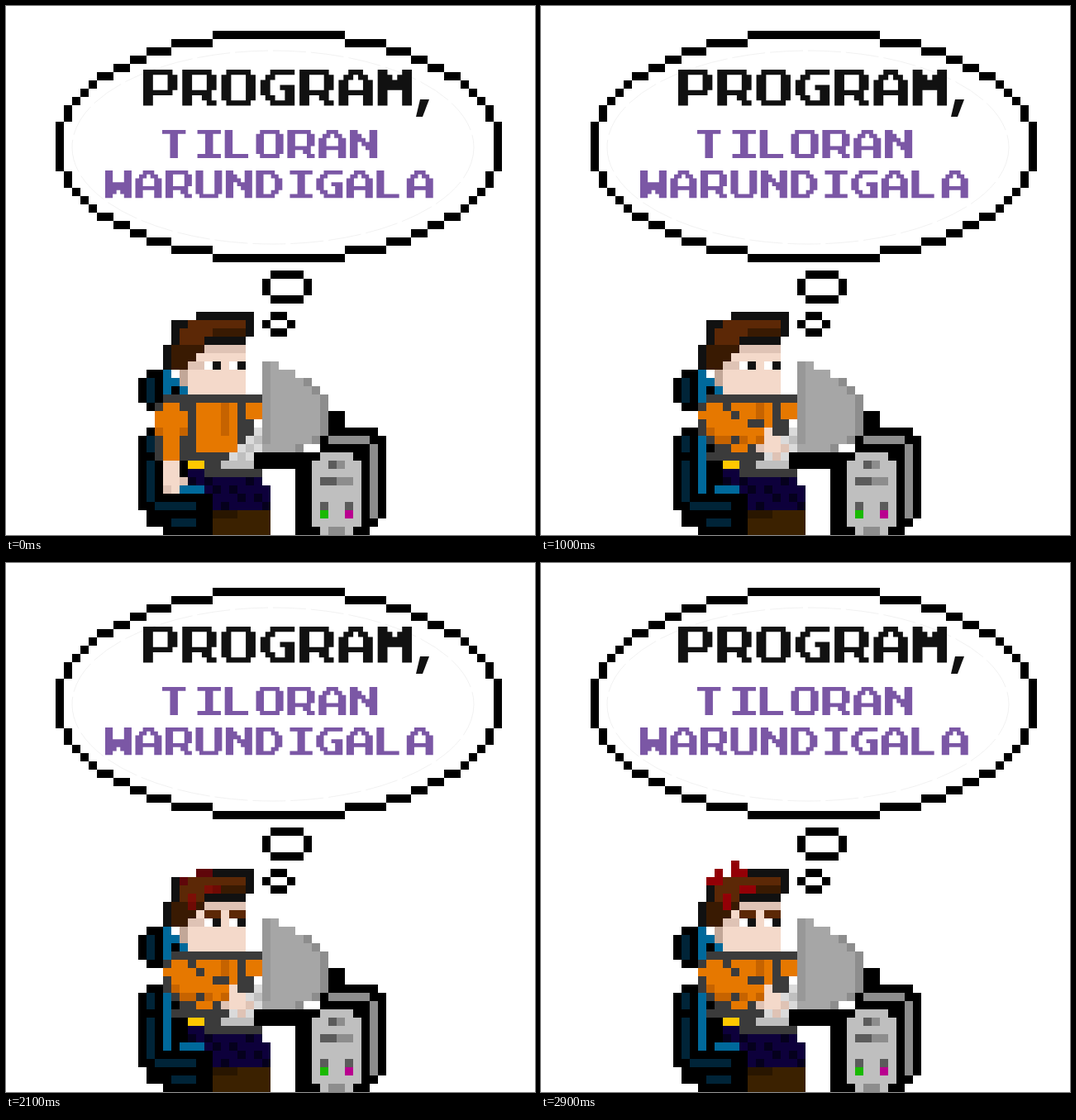
An HTML page that plays this animation: 640x640 px, repeating every 3 s.

```html
<!DOCTYPE html>
<html lang="en">
<head>
<meta charset="utf-8">
<title>Thinking programmer</title>
<style>
  html, body { margin: 0; width: 100%; height: 100%; overflow: hidden; background: #fff; }
  svg { display: block; width: 100vw; height: 100vh; }
</style>
</head>
<body>
<svg id="stage" viewBox="0 0 640 640"></svg>
<script>
const NS = 'http://www.w3.org/2000/svg';
const stage = document.getElementById('stage');
const BLACK = '#000', INK = '#111', NAVY = '#002438', BLUE = '#00699b';
const BROWN = '#5c2806', DARK = '#391a02', SKIN = '#f4d9ca', TAN = '#dfc3b5';
const ORANGE = '#e67800', RUST = '#c66300', CLOTH = '#3b3b3b', PURPLE = '#7b57a5';
const GREY = '#a6a6a6', SHADE = '#8d8d8d', LIGHT = '#bfbfbf', DIM = '#5b5b5b';

function add(parent, tag, attrs) {
  const el = document.createElementNS(NS, tag);
  for (const k in attrs) el.setAttribute(k, attrs[k]);
  return parent.appendChild(el);
}

// Pixel art lives on a grid of 10 px cells.
function layer() {
  return add(stage, 'g', { transform: 'scale(10)', 'shape-rendering': 'crispEdges' });
}

const rect = (x, y, w = 1, h = 1) => `M${x} ${y}h${w}v${h}h${-w}z`;

function box(g, fill, x, y, w = 1, h = 1, bevel = 0) {
  const d = bevel ? rect(x, y + bevel, w, h - 2 * bevel) + rect(x + bevel, y, w - 2 * bevel, h)
                  : rect(x, y, w, h);
  add(g, 'path', { fill, d });
}

// Fills every cell whose centre passes the test.
function cells(g, fill, test) {
  let d = '';
  for (let y = 36; y < 64; y++)
    for (let x = 16; x < 47; x++) if (test(x + 0.5, y + 0.5)) d += rect(x, y);
  add(g, 'path', { fill, d });
}

function poly(g, fill, corners, also = () => true) {
  const p = corners.split(' ').map(c => c.split(',').map(Number));
  cells(g, fill, (x, y) => also(Math.floor(x), Math.floor(y)) && p.reduce((inside, [ax, ay], i) => {
    const [bx, by] = p[(i + 1) % p.length];
    const hit = (ay > y) !== (by > y) && x < ax + (bx - ax) * (y - ay) / (by - ay);
    return hit ? !inside : inside;
  }, false));
}

function limb(g, fill, [ax, ay], [bx, by], r, lift = 0) {
  const dx = bx - ax, dy = by - ay, len = dx * dx + dy * dy;
  cells(g, fill, (x, y) => {
    const px = x - ax, py = y - ay + lift;
    const k = Math.max(0, Math.min(1, (px * dx + py * dy) / len));
    return Math.hypot(px - k * dx, py - k * dy) <= r;
  });
}

// Stepped ellipse: each row reaches in to the end of the row outside it.
function bubble(g, cx, cy, rx, ry) {
  let outer = 0;
  for (let y = cy - ry; y < cy; y++) {
    const half = Math.ceil(rx * Math.sqrt(1 - ((y + 0.5 - cy) / ry) ** 2) - 0.147);
    const w = outer ? Math.max(1, half - outer) : 2 * half;
    for (const left of [cx - half, cx + half - w])
      for (const top of [y, 2 * cy - y - 1]) box(g, BLACK, left, top, w);
    outer = half;
  }
}
const thought = layer();
bubble(thought, 33, 17, 27, 14);
bubble(thought, 34, 34, 3, 2);
bubble(thought, 33, 38.5, 1.4, 1.5);
add(stage, 'ellipse', {
  cx: 323, cy: 171, rx: 243, ry: 117, fill: 'none',
  stroke: '#e8e8e8', 'stroke-width': 0.6, 'stroke-dasharray': '40 6'
});

// Letters are pen strokes between grid points, drawn with a 2 x 1 nib.
const STROKES = {
  A: '06 02 20 30 52 56,04 54', D: '00 06 36 54 52 30 00', G: '50 20 02 04 26 56 53 43',
  I: '10 50,30 36,16 56', L: '00 06 46', M: '06 00 22,56 50 32,23 33', N: '06 00 55,50 56',
  O: '10 40 51 55 46 16 05 01 10', P: '06 00 40 51 53 44 04', R: '06 00 40 51 53 44 04,34 56',
  T: '00 40,20 26', U: '00 05 16 46 55 50', W: '00 06 24,50 56 34,23 33'
};

function glyph(strokes) {
  let d = '';
  for (const stroke of strokes.split(',')) {
    const pts = stroke.split(' ').map(p => [+p[0], +p[1]]);
    for (let i = 1; i < pts.length; i++) {
      const [ax, ay] = pts[i - 1], [bx, by] = pts[i];
      const n = Math.max(Math.abs(bx - ax), Math.abs(by - ay));
      for (let s = 0; s <= n; s++)
        d += rect(Math.round(ax + (bx - ax) * s / n), Math.round(ay + (by - ay) * s / n), 2);
    }
  }
  return d;
}

function write(text, x, y, sx, sy, fill) {
  const g = add(stage, 'g', {
    role: 'img', 'aria-label': text, fill, transform: `translate(${x} ${y}) scale(${sx} ${sy})`
  });
  [...text].forEach((c, i) => {
    if (STROKES[c]) add(g, 'path', { d: glyph(STROKES[c]), transform: `translate(${i * 8} 0)` });
  });
}
write('PROGRAM,', 166, 77, 5.91, 6.2, INK);
add(stage, 'path', { fill: INK, d: 'M501 113h11l-8 21h-8z' });
write('TILORAN', 189, 150, 4.73, 4.85, PURPLE);
write('WARUNDIGALA', 120, 199, 4.56, 4.75, PURPLE);

// Backpack
const pack = layer();
box(pack, BLACK, 16, 44, 5, 5, 1);
box(pack, NAVY, 17, 45, 1, 3);
box(pack, BLUE, 19, 44, 1, 8);
box(pack, BLUE, 20, 45);
box(pack, BLUE, 21, 46, 2);
box(pack, BLACK, 16, 51, 10, 11, 1);
box(pack, BLACK, 17, 61, 8, 2);
box(pack, BLACK, 19, 63, 6);
box(pack, NAVY, 17, 52, 1, 2);
box(pack, NAVY, 17, 55, 1, 5);
box(pack, NAVY, 18, 60, 5);
box(pack, NAVY, 20, 62, 3);
box(pack, BLUE, 19, 52, 1, 7);

// Legs
const legs = layer();
const TROUSERS = '22,56 30,56 32,59 32,61 25,61 25,59 22,58';
poly(legs, '#0d003b', TROUSERS);
poly(legs, '#05001d', TROUSERS, (x, y) => (3 * x + 5 * y) % 7 < 2);
box(legs, BLUE, 21, 58, 3);
box(legs, '#3b2100', 25, 61, 7, 3);
box(legs, '#291600', 25, 61, 3);

// Jacket and keyboard
const jacket = layer();
box(jacket, CLOTH, 20, 47, 11);
box(jacket, CLOTH, 21, 48, 9, 6);
box(jacket, CLOTH, 20, 54, 7);
box(jacket, CLOTH, 24, 55, 7, 2);
box(jacket, ORANGE, 23, 48, 5, 6);
box(jacket, ORANGE, 29, 48, 2, 2);
box(jacket, RUST, 26, 48, 1, 4);
box(jacket, '#ffc800', 22, 55, 2);
const KEYS = '25.7,56 30.7,51 32,51 32,54 30,56';
poly(jacket, LIGHT, KEYS);
poly(jacket, '#dadada', KEYS, (x, y) => (x + y) % 2 && y < 55);

// Arms: shoulder, elbow, wrist and fingertips
function arm(shoulder, elbow, wrist, hand) {
  const g = layer();
  const sleeve = [[shoulder, elbow, 1.6], [elbow, wrist, 1]];
  for (const [a, b, r] of sleeve) limb(g, CLOTH, a, b, r + 0.7);
  limb(g, TAN, wrist, hand, 1.2);
  limb(g, SKIN, wrist, hand, 1, 0.3);
  for (const [a, b, r] of sleeve) limb(g, RUST, a, b, r);
  for (const [a, b, r] of sleeve) limb(g, ORANGE, a, b, r - 0.05, 0.4);
  return g;
}
const arms = {
  down: arm([20, 49.7], [20, 51], [20, 54.2], [20.4, 58]),
  swing: arm([20.5, 49.7], [20.7, 52], [22, 54.2], [23.2, 57]),
  low: arm([21, 49.7], [22, 51.5], [25, 53], [27, 56.2]),
  press: arm([21, 49.8], [22, 51], [25.8, 52], [28.4, 53.4]),
  lift: arm([21.6, 49.6], [22.6, 50.4], [27, 50.7], [29.6, 50.1])
};

// Head
const head = layer();
poly(head, SKIN, '24,41 29,41 29,47 23,47 22,46 22,43');
poly(head, INK, '23.6,37 30,37 30,40 28.9,41 24,41 22,44 19.2,44 19.2,41.2 20,41 20.2,38.6');
poly(head, DARK, '21,39 29,39 29,40 24,40 24,41 22,44 20,44 20,42 21,41');
poly(head, BROWN, '23,38 29,38 29,39 25,39 25,40 23,41 21,41 21,39');
box(head, TAN, 24, 41, 5);
box(head, TAN, 22, 43, 2);
box(head, '#c2a798', 21, 44, 1, 2);
for (const x of [24, 27]) {
  box(head, '#fff', x, 43);
  box(head, INK, x + 1, 43);
}

const brows = layer();
for (const x of [24, 27]) box(brows, BROWN, x, 42, 2);

const RED = '#930006';
const glow = layer();
box(glow, RED, 21, 38);
box(glow, RED, 23, 37, 2);
box(glow, RED, 22, 40, 1, 2);
box(glow, RED, 24, 39, 2);
const flames = layer();
box(flames, RED, 20, 38);
box(flames, RED, 21, 37);
box(flames, RED, 23, 36);

// Desk and computer
const desk = layer();
box(desk, BLACK, 30, 54, 8, 2);
box(desk, BLACK, 39, 49, 2, 2);
box(desk, BLACK, 38, 51, 8, 12, 1);
box(desk, BLACK, 35, 54, 9, 10);
box(desk, '#fff', 30, 56, 0, 0);
box(desk, SHADE, 39, 52, 5);
box(desk, SHADE, 44, 53, 1, 9);
box(desk, LIGHT, 37, 54, 6, 10, 1);
for (const [x, y] of [[39, 55], [38, 57]]) {
  box(desk, DIM, x, y, y - 55 || 1);
  box(desk, SHADE, x + (y - 55 || 1), y, y - 55 || 1);
}
box(desk, SHADE, 39, 63, 2);
for (const [x, lamp] of [[38, '#19b900'], [41, '#b9008f']]) {
  box(desk, DIM, x, 60);
  box(desk, lamp, x, 61);
}

// Monitor: the lit face is the same dome, one cell narrower
const dome = d => `31,43 ${32.2 - d / 4},43 ${36.4 - d},45 ${39 - d},47 ${39 - d},51.2 ${36 - d},53.9 32,54 31,53`;
const monitor = layer();
poly(monitor, SHADE, dome(0));
poly(monitor, GREY, dome(1));
box(monitor, '#989898', 31, 43, 1, 10);

const LOOP = 3000, ANGRY = 1800, ABLAZE = 2300;

function poseAt(t) {
  if (t < 600) return ['down', 'swing', 'low'][Math.floor(t / 200)];
  const beat = t < ANGRY ? 200 : 100;
  return Math.floor(t / beat) % 2 ? 'press' : 'lift';
}

function show(el, on) {
  el.style.display = on ? '' : 'none';
}

function draw(now) {
  const t = now % LOOP;
  const pose = poseAt(t);
  for (const name in arms) show(arms[name], name === pose);
  show(brows, t >= ANGRY);
  const step = Math.floor(t / 100) * 100;
  const heat = Math.max(0, Math.min(1, (step - ANGRY) / (ABLAZE - ANGRY)));
  glow.style.opacity = heat;
  show(flames, t >= ABLAZE);
}

const start = performance.now();
function tick() {
  draw(performance.now() - start);
  requestAnimationFrame(tick);
}
tick();
</script>
</body>
</html>
```
